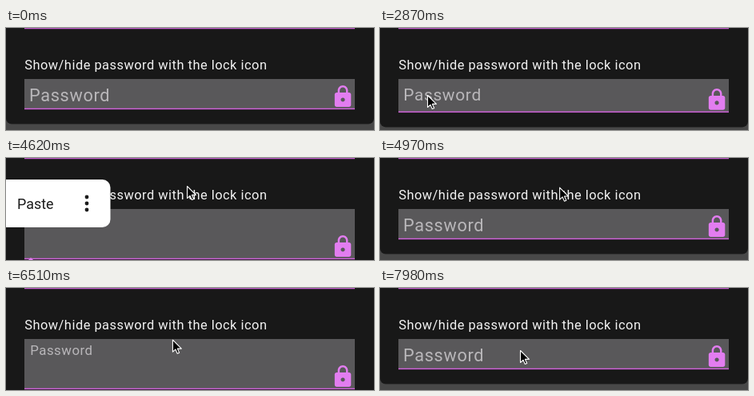
Write an HTML page that moves like this. It is 460 px wide and 128 px high and loops after 8 s.

```html
<!DOCTYPE html>
<html lang="en">
<head>
<meta charset="utf-8">
<title>Password field</title>
<style>
html, body { margin: 0; width: 100%; height: 100%; overflow: hidden; background: #484848; }
svg { display: block; width: 460px; height: 128px; font-family: Roboto, sans-serif; }
</style>
</head>
<body>
<svg viewBox="0 0 460 128">
  <rect width="460" height="128" fill="#484848"/>
  <rect id="panel" y="-20" width="460" rx="7" fill="#181818"/>
  <rect x="23" width="413" height="1.2" fill="#c45bce"/>
  <text x="23.2" y="52" font-size="16.4" letter-spacing=".5" fill="#f3f3f3">Show/hide password with the lock icon</text>
  <rect id="field" x="23" y="64" width="413" fill="#59585a"/>
  <rect id="line" x="23" width="413" height="1.5" fill="#d062da"/>
  <text id="label" font-size="21.7" letter-spacing=".68" fill="#b9b7ba">Password</text>
  <rect id="caret" x="29.5" y="98" width="2" height="24" fill="#e27df0"/>
  <path id="lock" fill="#e27df0" d="M18 8h-1V6c0-2.76-2.24-5-5-5S7 3.24 7 6v2H6c-1.1 0-2 .9-2 2v10c0 1.1.9 2 2 2h12c1.1 0 2-.9 2-2V10c0-1.1-.9-2-2-2zm-6 9c-1.1 0-2-.9-2-2s.9-2 2-2 2 .9 2 2-.9 2-2 2zm3.1-9H8.9V6c0-1.71 1.39-3.1 3.1-3.1s3.1 1.39 3.1 3.1z"/>
  <g id="popup">
    <path d="M31 125l4 4h-8z" fill="#e27df0"/>
    <rect x="-20" y="27" width="150.5" height="60" rx="10" fill="#fff"/>
    <text x="14" y="63.5" font-size="17.9" fill="#1c1c1c">Paste</text>
    <g fill="#1c1c1c">
      <circle cx="101" cy="49" r="2.4"/>
      <circle cx="101" cy="57" r="2.4"/>
      <circle cx="101" cy="65" r="2.4"/>
    </g>
  </g>
  <g id="pointer">
    <circle id="tap" cx="1" cy="1" r="22.5" fill="#fff" fill-opacity=".25"/>
    <path d="M.5.5V15.5L4 12.3l2.3 5.2 2.4-1L6.4 11.400h5z" fill="#000" stroke="#fff" stroke-width="1.1" stroke-linejoin="round"/>
  </g>
</svg>
<script>
const LOOP = 8000, STEP = 70;
const el = id => document.getElementById(id);
const set = (id, attrs) => {
  for (const k in attrs) el(id).setAttribute(k, attrs[k]);
};
const mix = (a, b, u) => a + (b - a) * u;
const ramp = (t, a, b) => {
  const u = Math.min(1, Math.max(0, (t - a) / (b - a)));
  return u * u * (3 - 2 * u);
};

// Pointer stops: time, x, y
const stops = [
  [490, 155, 130], [840, 4, 64], [910, 4, 64], [1190, 41, 79],
  [1260, 41, 79], [1400, 59, 84], [3150, 59, 84], [3640, 13, 56],
  [3710, 13, 56], [4410, 226, 35], [4900, 226, 35], [5530, 171, 83],
  [5880, 171, 83], [6370, 205, 67], [7070, 233, 45], [7700, 233, 45],
  [7980, 175, 78]
];
const taps = [[1540, 1680], [2660, 2730], [4550, 4620], [5600, 5740], [7210, 7280]];

function pointerAt(t) {
  let i = 1;
  while (i < stops.length - 1 && stops[i][0] < t) i++;
  const [t0, x0, y0] = stops[i - 1], [t1, x1, y1] = stops[i];
  const u = ramp(t, t0, t1);
  return [mix(x0, x1, u), mix(y0, y1, u)];
}

function draw(t) {
  const open = ramp(t, 2800, 3080) - ramp(t, 4690, 4970)
             + ramp(t, 5740, 6020) - ramp(t, 7350, 7630);
  const grow = 25 * open;
  set('panel', { height: 140.5 + grow });
  set('field', { height: 37.5 + grow });
  set('line', { y: 100.7 + grow });
  set('lock', { transform: `translate(405.7 ${70.8 + grow}) scale(1.28)` });
  set('label', {
    transform: `translate(${mix(29, 30.2, open)} ${mix(92, 84, open)}) scale(${mix(1, .775, open)})`
  });

  const focus = t < 5500 ? 2840 : 5810;
  set('caret', { opacity: +(open > .99 && (t - focus) % 1000 < 500) });
  set('popup', { opacity: ramp(t, 2940, 3150) - ramp(t, 4690, 4900) });

  set('pointer', { transform: `translate(${pointerAt(t)})`, opacity: +(t > 490) });
  set('tap', { opacity: +taps.some(([a, b]) => t >= a && t < b) });
}

const start = performance.now();
function tick() {
  const t = (performance.now() - start) % LOOP;
  draw(Math.floor(t / STEP) * STEP);
  requestAnimationFrame(tick);
}
tick();
</script>
</body>
</html>
```
